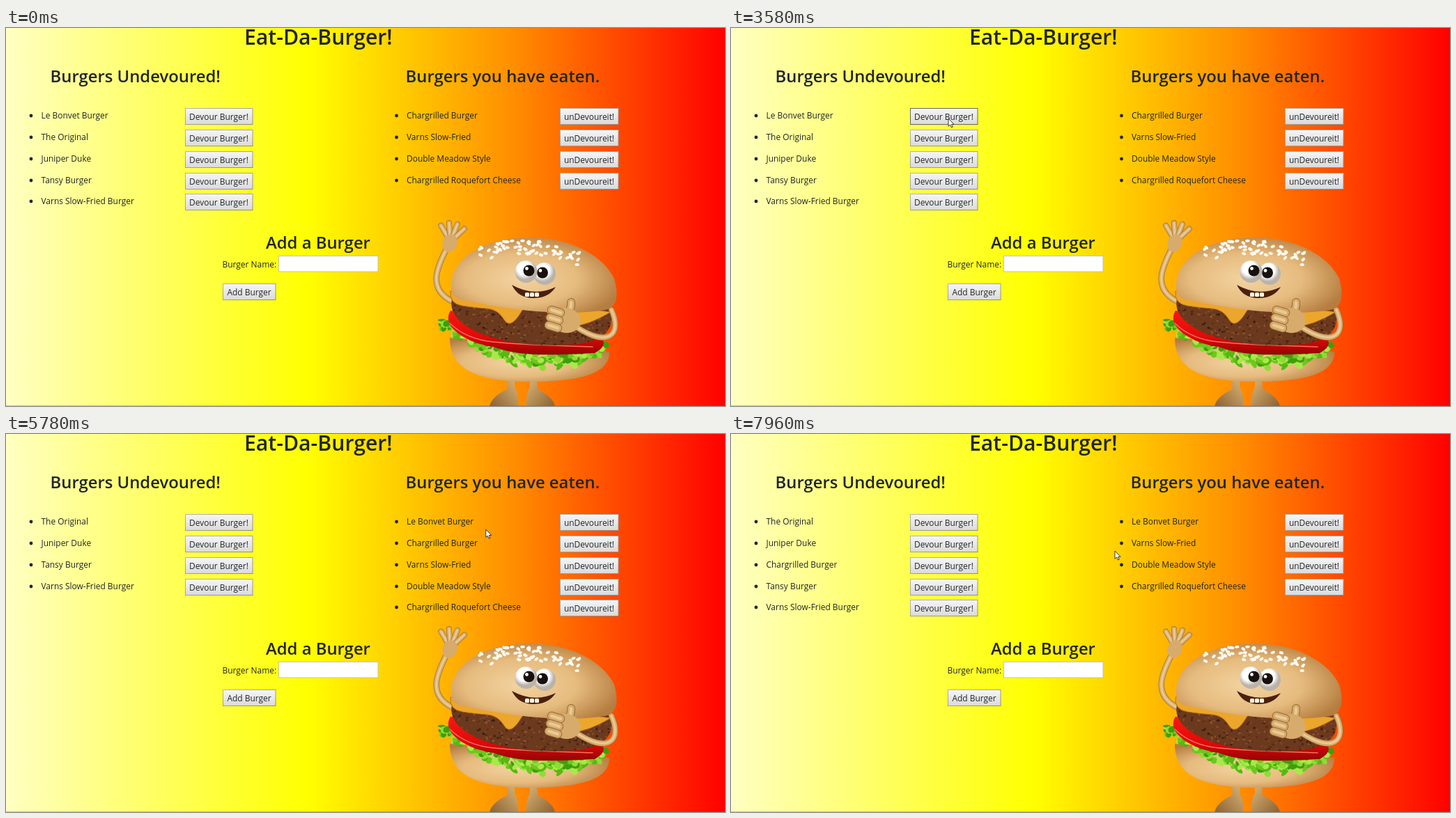
An HTML page that plays this animation: 1032x543 px, repeating every 8000 ms.

```html
<!DOCTYPE html>
<html lang="en">
<head>
<meta charset="utf-8">
<title>Eat-Da-Burger!</title>
<style>
  html, body { margin: 0; width: 100%; height: 100%; overflow: hidden; }
  body { background: linear-gradient(to right, #ffffc2, #ff0 42%, darkorange 71%, #f00); }
  svg { display: block; width: 1032px; height: 543px; }
  text { font: 11.95px "Open Sans", "Noto Sans", sans-serif; fill: #212529; }
  .h1, .h2 { font-weight: 600; font-size: 23.85px; }
  .h1 { font-size: 30.2px; }
  .mid { text-anchor: middle; }
  .button { fill: url(#face); stroke: url(#edge); }
  .hover { stroke: #666; }
  .limb { fill: none; stroke-linecap: round; }
</style>
</head>
<body>
<svg viewBox="0 0 1032 543">
  <defs>
    <linearGradient id="face" x2="0" y2="1"><stop stop-color="#f6f6f6"/><stop offset="1" stop-color="#dadada"/></linearGradient>
    <linearGradient id="edge" x2="1" y2="1"><stop stop-color="#b4b4ac"/><stop offset="1" stop-color="#8c8c8c"/></linearGradient>
    <linearGradient id="foot" x2="1" y2="1"><stop stop-color="#e0bb7d"/><stop offset="1" stop-color="#8a6030"/></linearGradient>
    <radialGradient id="bun" cx=".42" cy=".55" r=".62"><stop stop-color="#f3d3a0"/><stop offset=".55" stop-color="#e6bb7e"/><stop offset="1" stop-color="#b57d40"/></radialGradient>
    <radialGradient id="eye" cx=".42" cy=".35"><stop offset=".6" stop-color="#fff"/><stop offset="1" stop-color="#b9b3aa"/></radialGradient>
    <linearGradient id="tomato" x2="0" y2="1"><stop stop-color="#f8180f"/><stop offset=".6" stop-color="#e00a08"/><stop offset="1" stop-color="#930404"/></linearGradient>
    <path id="pattyShape" d="M640 389C632 425 690 451 760 455S880 450 867 404Z"/>
    <clipPath id="pattyClip"><use href="#pattyShape"/></clipPath>
  </defs>

  <text class="h1" x="342" y="24">Eat-Da-Burger!</text>
  <text class="h2" x="63.5" y="78">Burgers Undevoured!</text>
  <text class="h2" x="573.5" y="78">Burgers you have eaten.</text>
  <text class="h2" x="373" y="317">Add a Burger</text>
  <text x="310.5" y="344">Burger Name:</text>
  <rect x="391.5" y="327.5" width="142.5" height="22.5" fill="#fff" stroke="#c4c4b0"/>
  <rect class="button" x="311.5" y="367.5" width="75.5" height="23"/>
  <text class="mid" x="349" y="384">Add Burger</text>

  <g id="behind"></g>
  <path fill="url(#bun)" d="M637 445C637 482 662 508 750 508S866 492 866 465Z"/>
  <g id="lettuce"></g>
  <path fill="url(#tomato)" d="M638 406C622 432 670 455 700 458C740 474 800 469 845 467Q868 455 850 440Z"/>
  <path class="limb" stroke="#ff6c5f" stroke-width="1.6" d="M637 424Q660 447 700 451T842 458"/>
  <use href="#pattyShape" fill="#6b391e"/>
  <g id="patty" clip-path="url(#pattyClip)"></g>
  <path fill="#eda62c" stroke="#b8730f" d="M638 378Q636 396 655 399T690 403T715 419T740 407T780 413T868 408Z"/>
  <path fill="url(#bun)" d="M639 375C636 341 668 309 731 302C801 296 855 323 873 360Q884 400 860 405C800 415 720 405 650 389Q640 386 639 375Z"/>
  <g id="seeds"></g>
  <path fill="#4b200c" d="M726 369Q758 387 789 372Q779 388 757 388T726 369Z"/>
  <g id="front"></g>

  <g id="rows"></g>
  <path id="pointer" fill="#fff" stroke="#222" stroke-width=".9" d="M0 0V11.3L2.6 9L4.4 12.9L6.2 12.1L4.5 8.3H8Z"/>
  <path d="M0 542.5H1032" stroke="#953" opacity=".35"/>
</svg>
<script>
const $ = id => document.getElementById(id);
const LOOP = 8000;

let seed = 11;
const random = (low = 0, high = 1) => {
  seed = seed * 16807 % 2147483647;
  return low + (high - low) * seed / 2147483647;
};
const many = (count, make) => Array.from({ length: count }, (_, i) => make(i)).join('');
const ellipse = (x, y, rx, ry, fill, turn = 0) =>
  `<ellipse rx="${rx}" ry="${ry}" fill="${fill}" transform="translate(${x} ${y}) rotate(${turn})"/>`;

// A rounded limb: dark rim, skin and a soft highlight
const limb = (d, width) => [['#966b35', 1], ['#d6ab6c', .84], ['#e9ca94', .35]].map(([color, part]) =>
  `<path class="limb" d="${d}" stroke="${color}" stroke-width="${width * part}"/>`).join('');

// Feet, waving arm and hand
const foot = (x, side) => `<path fill="url(#foot)" transform="translate(${x} 543) scale(${side} 1)"
  d="M-5-45V-27Q-12-14-10 2H31Q30-12 6-24L5-45Z"/>`;
$('behind').innerHTML = foot(725, -1) + foot(757, 1) +
  limb('M641 393C605 375 618 345 632 318', 8.5) +
  many(4, i => {
    const angle = -2.1 + .45 * i;
    return limb(`M638 307l${27 * Math.cos(angle)} ${27 * Math.sin(angle)}`, 8);
  }) +
  ellipse(637, 309, 10.5, 13, '#d6ab6c', 20);

// Lettuce frills along a curve
const rim = u => {
  const v = 1 - u;
  return [624 * v * v + 1490 * u * v + 862 * u * u, 426 * v * v + 1030 * u * v + 463 * u * u];
};
const greens = ['#3f9d0c', '#6cc91c', '#8fdc35', '#58b812', '#a8e94a'];
$('lettuce').innerHTML = many(190, i => {
  const depth = i / 190;
  const [x, y] = rim(random());
  return ellipse(x, y + 2 - 17 * depth + random(-5, 5), random(3, 8), random(2, 5),
    greens[i % 5], random(-70, 70));
});

// Meat grains and sesame seeds
const browns = ['#3f1f0f', '#8b512d', '#562a13', '#794421'];
$('patty').innerHTML = many(420, i =>
  ellipse(random(637, 872), random(388, 460), random(.8, 2.6), random(.8, 2), browns[i % 4]));
$('seeds').innerHTML = many(62, () => {
  const u = random(-1, 1);
  return ellipse(752 + 72 * u, 305 + 14 * u * u + 4 * u + random(0, 20), 3.2, 2, '#fffaf0', random(-50, 50));
});

// Face and thumbs-up
const eye = (x, y, look) => ellipse(x, y, 16, 16, 'url(#eye)') +
  ellipse(x + look, y - 1.5, 8, 8, '#17100d') + ellipse(x + look - 3, y - 4.5, 2.4, 2.4, '#fff');
$('front').innerHTML = eye(773, 353, -3) + eye(746.5, 350, 4) +
  many(3, i => `<rect x="${745 + 7 * i}" y="380" width="6" height="6" rx="1.5" fill="#fffbe9"/>`) +
  limb('M869 405C885 440 865 460 818 429', 8.5) +
  limb('M804 414Q812 404 811 394', 12) +
  ellipse(804, 420, 21, 18, '#d6ab6c', 10) +
  many(3, i => limb(`M${783 - 2 * i} ${405 + 11 * i}l13 4`, 12.5));

// Lists
const [first, grilled] = ['Le Bonvet Burger', 'Chargrilled Burger'];
const top2 = ['The Original', 'Juniper Duke'];
const rest = ['Tansy Burger', 'Varns Slow-Fried Burger'];
const eaten = ['Varns Slow-Fried', 'Double Meadow Style', 'Chargrilled Roquefort Cheese'];
const states = [
  { from: 0, left: [first, ...top2, ...rest], right: [grilled, ...eaten] },
  { from: 4060, left: [...top2, ...rest], right: [first, grilled, ...eaten] },
  { from: 7520, left: [...top2, grilled, ...rest], right: [first, ...eaten] },
];

function column(names, x, buttonX, width, label, [px, py]) {
  return names.map((name, i) => {
    const y = 115 + Math.round(30.85 * i);
    const hover = px >= buttonX && px < buttonX + width && py >= y && py < y + 24;
    return ellipse(x - 14.5, y + 11, 2.4, 2.4, '#212529') +
      `<text x="${x}" y="${y + 14.7}">${name}</text>
      <rect class="button${hover ? ' hover' : ''}" x="${buttonX + .5}" y="${y + .5}" width="${width - .5}" height="23"/>
      <text class="mid" x="${buttonX + width / 2}" y="${y + 16.7}">${label}</text>`;
  }).join('');
}

// Pointer path: time, x, y
const path = [
  [310, 944, 530], [1100, 370, 222], [1250, 320, 191], [2030, 266, 136], [2260, 265, 135],
  [2640, 92, 113], [3580, 312, 130], [4270, 312, 130], [4650, 490, 156], [5130, 684, 129],
  [5460, 802, 129], [6010, 608, 143], [6640, 735, 152], [7040, 808, 158], [7450, 808, 158],
  [7960, 551, 168],
];

function pointerAt(time) {
  const next = path.findIndex(key => key[0] > time);
  if (next === 0) return [-50, -50];
  if (next < 0) return path.at(-1).slice(1);
  const [t0, x0, y0] = path[next - 1], [t1, x1, y1] = path[next];
  const u = (time - t0) / (t1 - t0);
  return [x0 + (x1 - x0) * u, y0 + (y1 - y0) * u];
}

let shown = '';
function draw() {
  const time = performance.now() % LOOP;
  const point = pointerAt(time);
  const { left, right } = states.findLast(state => state.from <= time);
  const rows = column(left, 50.5, 257, 97, 'Devour Burger!', point) +
    column(right, 575, 795, 84, 'unDevoureit!', point);
  if (rows !== shown) $('rows').innerHTML = shown = rows;
  $('pointer').setAttribute('transform', `translate(${point})`);
  requestAnimationFrame(draw);
}
draw();
</script>
</body>
</html>
```
